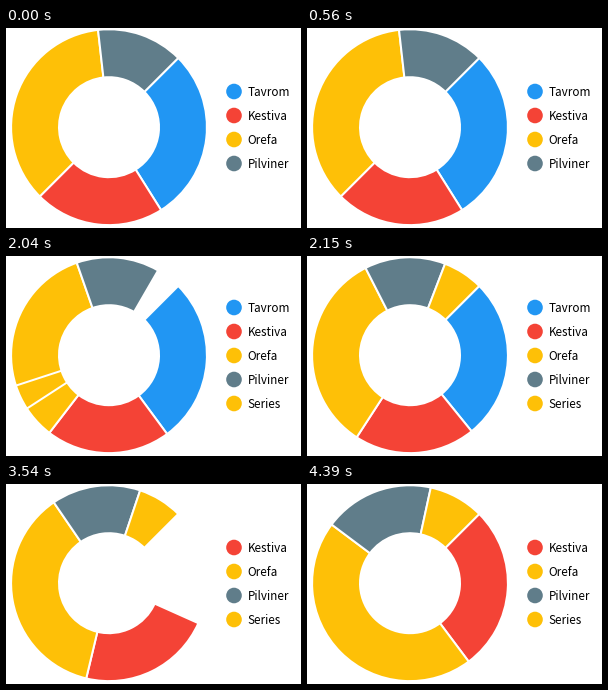
Animation, 295 px wide and 200 px high, one loop 5.35 s. Source, as a matplotlib script:

```python
import numpy as np
import matplotlib.pyplot as plt
from matplotlib.animation import FuncAnimation
from matplotlib.patches import Circle, Polygon, Wedge

W, H, DPI = 295, 200, 100
LOOP, TICK = 5350, 10
PX = 72 / DPI
CX, CY, R_OUT, R_IN = 103, 99.2, 97.9, 50
LEGEND_Y, ROW = 99.5, 24
START = 45

BLUE, RED, AMBER, SLATE = "#2196F3", "#F44336", "#FEC007", "#607D8A"
SERIES = [("Tavrom", BLUE, 8), ("Kestiva", RED, 6), ("Orefa", AMBER, 10),
          ("Pilviner", SLATE, 4), ("Series", AMBER, 2)]
N = len(SERIES)


def layout(shown):
    """Rotation and sweep per slice; slices not shown stay at zero."""
    total = sum(SERIES[i][2] for i in shown)
    out = np.zeros((N, 2))
    angle = START
    for i in shown:
        sweep = 360 * SERIES[i][2] / total
        out[i] = angle, sweep
        angle += sweep
    return out


EMPTY = np.zeros((N, 2))
FOUR = layout([0, 1, 2, 3])
FIVE = layout([0, 1, 2, 3, 4])
LAST = layout([1, 2, 3, 4])

# begin, end, steps, progress at the first step, from, to
MOVES = [(370, 560, 5, 0.18, EMPTY, FOUR),
         (1870, 2150, 6, 0.055, FOUR, FIVE),
         (3490, 3710, 6, 0.10, FIVE, LAST)]
REMOVED = 3110
POINTER = (4360, 4390)


def pose(t):
    state = FOUR
    for begin, end, steps, first, a, b in MOVES:
        if t < begin:
            break
        k = min(int((t - begin) * (steps - 1) / (end - begin) + 0.1), steps - 1)
        p = first + (1 - first) * k / (steps - 1)
        state = a + (b - a) * p
    return state


def legend_items(t):
    if t < MOVES[1][0]:
        return range(0, 4)
    return range(0, 5) if t < MOVES[2][0] else range(1, 5)


fig = plt.figure(figsize=(W / DPI, H / DPI), dpi=DPI, facecolor="white")
ax = fig.add_axes([0, 0, 1, 1])
ax.set_xlim(0, W)
ax.set_ylim(H, 0)
ax.axis("off")

slices, dots, labels = [], [], []
for i, (name, color, _) in enumerate(SERIES):
    slices.append(ax.add_patch(Wedge(
        (CX, CY), R_OUT, 0, 1, width=R_OUT - R_IN, facecolor=color,
        edgecolor="white", linewidth=2 * PX, zorder=2 + i)))
    dots.append(ax.add_patch(Circle((228, 0), 7.8, facecolor=color, linewidth=0)))
    labels.append(ax.text(241.7, 0, name, family="Noto Sans CJK JP",
                          size=11.7 * PX, color="black", va="baseline"))

arrow = [(0, 0), (0, 16), (4, 12.5), (7, 18), (9, 17), (6.5, 11.5), (11.5, 11.5)]
pointer = ax.add_patch(Polygon([(291.5 + x, 94.5 + y) for x, y in arrow],
                               facecolor="white", edgecolor="black",
                               linewidth=PX, zorder=20))


def draw(frame):
    t = frame * TICK
    for i, (wedge, (angle, sweep)) in enumerate(zip(slices, pose(t))):
        wedge.set_visible(sweep > 0 and not (i == 0 and t >= REMOVED))
        wedge.set_theta1(angle - 90)
        wedge.set_theta2(angle + sweep - 90)
    items = legend_items(t)
    for i in range(N):
        shown = i in items
        dots[i].set_visible(shown)
        labels[i].set_visible(shown)
        if shown:
            y = LEGEND_Y + ROW * (i - items[0] - (len(items) - 1) / 2)
            dots[i].center = (228, y)
            labels[i].set_y(y + 4.5)
    pointer.set_visible(POINTER[0] <= t < POINTER[1])
    return slices + dots + labels + [pointer]


anim = FuncAnimation(fig, draw, frames=LOOP // TICK, interval=TICK,
                     init_func=lambda: draw(0), repeat=True, repeat_delay=0)
plt.show()
```
